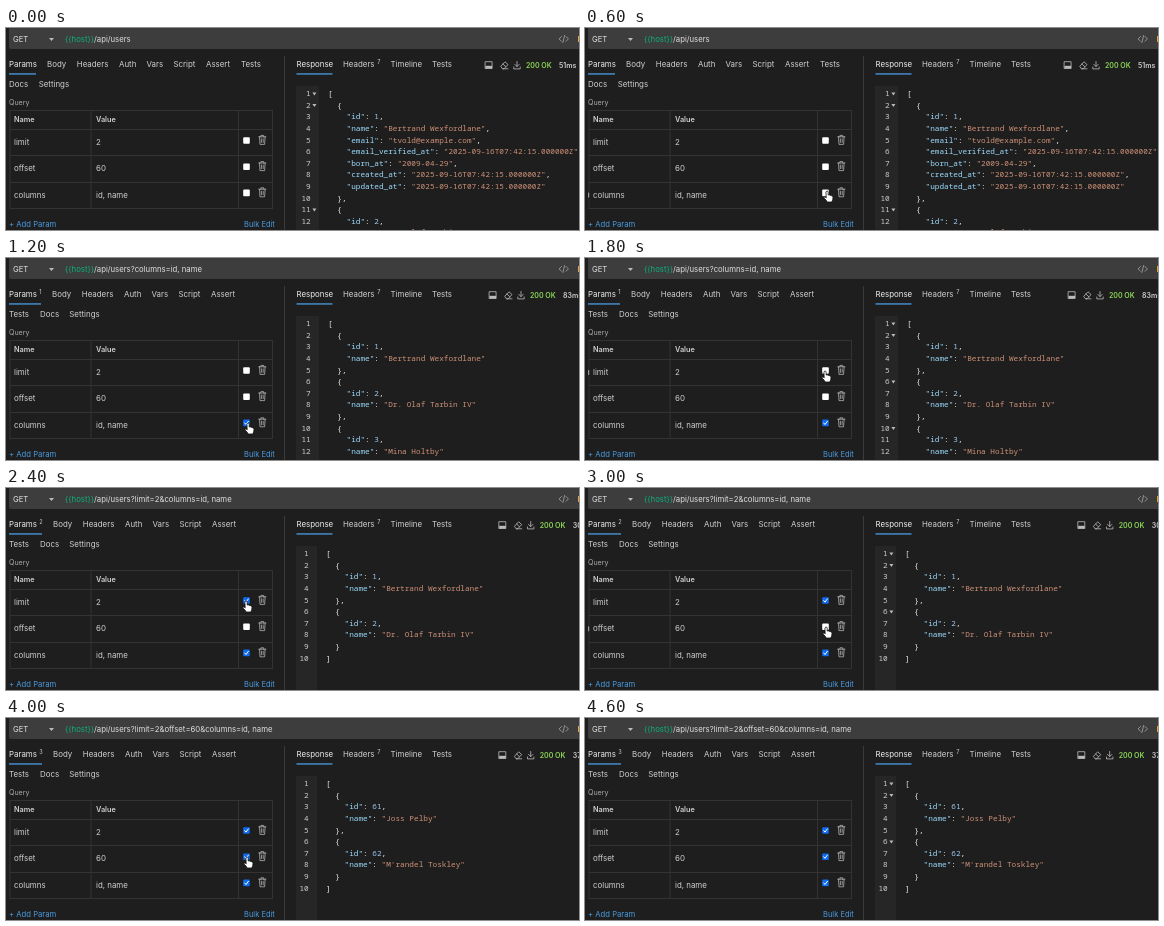
An HTML page for the animation above (4800 ms loop, 573 by 202 pixels).

```html
<!DOCTYPE html>
<html lang="en">
<head>
<meta charset="utf-8">
<title>Query parameters</title>
<style>
  html, body { margin: 0; width: 573px; height: 202px; overflow: hidden; background: #1e1e1e; }
  svg { display: block; }
  text { font: 7.9px Inter, sans-serif; fill: #d0d0d0; white-space: pre; }
  .code text { font: 500 7.72px "Noto Sans Mono", "DejaVu Sans Mono", monospace; }
</style>
</head>
<body>
<svg id="stage" width="573" height="202" viewBox="0 0 573 202"></svg>
<script>
const LOOP = 4800, STEP = 200;
const LINE = 11.6, CHAR = 4.63;
const AMBER = '#e8a33a', BLUE = '#4a9be0';
const ROWS = [
  { key: 'limit', value: '2', y: 114, from: 2000 },
  { key: 'offset', value: '60', y: 140.2, from: 3200 },
  { key: 'columns', value: 'id, name', y: 166.4, from: 800 }
];

// Pointer stops: time, x, y, row showing its drag handle (-1 for none)
const POINTER = [
  [200, 247, 169, 2], [400, 243, 165, 2], [600, 241, 163, 2], [800, 241, 164, -1],
  [1200, 241, 165, -1], [1400, 241, 160, 2], [1600, 239, 116, 0], [1800, 239, 113, 0],
  [2000, 239, 113, -1], [2600, 239, 115, -1], [2800, 240, 136, 1], [3000, 240, 139, 1],
  [3200, 240, 139, -1], [4200, 240, 131, 1]
];
const POINTER_END = 4400;

const stamp = '2025-09-16T07:42:15.000000Z';
const user = (id, name) => ({ id, name });
const first = user(1, 'Bertrand Wexfordlane');
const second = user(2, 'Dr. Olaf Tarbin IV');
const full = {
  ...first, email: 'tvold@example.com', email_verified_at: stamp,
  born_at: '2009-04-29', created_at: stamp, updated_at: stamp
};
const RESPONSES = [
  { from: 0, foldFrom: 0, data: [full, second], ms: '51ms', shift: 0, codeX: 322 },
  { from: 1200, foldFrom: 1600, data: [first, second, user(3, 'Mina Holtby'), user(4, '')], ms: '83ms', shift: 4, codeX: 322 },
  { from: 2400, foldFrom: 2800, data: [first, second], ms: '30ms', shift: 13.7, codeX: 320 },
  { from: 3800, foldFrom: 4200, data: [user(61, 'Joss Pelby'), user(62, "M'randel Toskley")], ms: '37ms', shift: 13.7, codeX: 320 }
];

const esc = s => s.replace(/&/g, '&amp;').replace(/</g, '&lt;').replace(/>/g, '&gt;');
const span = (s, fill) => `<tspan fill="${fill}">${esc(s)}</tspan>`;
const text = (x, y, s, attrs = '') => `<text x="${x}" y="${y}" ${attrs}>${esc(s)}</text>`;
const rect = (x, y, w, h, fill, r = 0) =>
  `<rect x="${x}" y="${y}" width="${w}" height="${h}" rx="${r}" fill="${fill}"/>`;
const path = (d, stroke, fill = 'none', width = 0.8, extra = '') =>
  `<path d="${d}" stroke="${stroke}" fill="${fill}" stroke-width="${width}" stroke-linejoin="round" stroke-linecap="round" ${extra}/>`;
const style = s => `style="${s}"`;
const latest = (list, t, start) => list.filter(item => start(item) <= t).pop();

function topBar(active) {
  const query = active.map(r => `${r.key}=${r.value}`).join('&');
  const url = span('{{host}}', '#0bb27e') + span('/api/users' + (query && '?' + query), '#e0e0e0');
  return rect(3, 0, 574, 21, '#3d3d3d', 2) + rect(3, 0, 570, 4, '#3d3d3d')
    + text(7, 13.8, 'GET', style('fill:#e4e4e4;font-size:7.7px'))
    + path('M43 10h5l-2.5 3z', 'none', '#bbb')
    + `<text x="59" y="13.8" style="font-size:7.74px">${url}</text>`
    + path('M555.5 8.5l-2.4 2.4 2.4 2.4M560 8.5l2.4 2.4-2.4 2.4M558.6 7.5l-1.7 7', '#aaa')
    + rect(572, 8, 1, 6, AMBER);
}

function requestTabs(count) {
  const shift = count ? (count > 1 ? 6 : 5) : 0;
  const names = [['Body', 41], ['Headers', 70.8], ['Auth', 113], ['Vars', 140.5], ['Script', 167.5], ['Assert', 200]];
  const lower = count ? [['Tests', 3], ['Docs', 34], ['Settings', 63.3]] : [['Docs', 3], ['Settings', 32.7]];
  return text(3, 39.3, 'Params', style('fill:#eee'))
    + rect(3, 45.3, 27 + shift, 1.3, BLUE)
    + (count ? text(33.2, 36.2, String(count), style('font-size:5.6px')) : '')
    + names.map(([s, x]) => text(x + shift, 39.3, s)).join('')
    + (count ? '' : text(235, 39.3, 'Tests'))
    + lower.map(([s, x]) => text(x, 58.6, s)).join('');
}

function checkbox(y, on) {
  return rect(237.2, y - 4.8, 6.6, 6.6, on ? '#0f6bf0' : '#fff', 1)
    + (on ? path(`M238.7 ${y - 1.4}l1.3 1.5 2.4 -3.2`, '#fff', 'none', 1) : '');
}

function trash(y) {
  return path('M-3.6 -3.2h7.2M-1.4 -3.2v-1.4h2.8v1.4M-2.8 -3.2l.5 7.6h4.6l.5 -7.6M-.9 -1.2v3.6M.9 -1.2v3.6',
    '#bbb', 'none', 0.75, `transform="translate(256.3 ${y - 2})"`);
}

function table(active) {
  const lines = 'M4 82.5H266.5M4 101.5H266.5M4 127.5H266.5M4 154.5H266.5M4 180.5H266.5'
    + 'M4 82.5V180.5M85 82.5V180.5M232.5 82.5V180.5M266.5 82.5V180.5';
  const head = style('font-weight:600;font-size:7.3px');
  return text(3, 77.3, 'Query', style('font-size:7.1px;fill:#aaa'))
    + path(lines, '#333', 'none', 1)
    + text(8, 94, 'Name', head) + text(90, 94, 'Value', head)
    + ROWS.map(r => text(8, r.y + 3.1, r.key) + text(90, r.y + 3.1, r.value)
      + checkbox(r.y, active.includes(r)) + trash(r.y)).join('')
    + text(3, 198.8, '+ Add Param', style(`fill:${BLUE};font-size:7.7px`))
    + text(238, 198.8, 'Bulk Edit', style(`fill:${BLUE};font-size:7.5px`));
}

function responseBar({ ms, shift }) {
  const icons = path('M479.5 33.7h6.6v6.8h-6.6z', '#bbb') + rect(479.5, 37.8, 6.6, 2.7, '#bbb')
    + path('M495 38l4-4.2 3 2.8 -4 4.2h-1.2zM496.9 36l3 2.8M497 40.8h5', '#bbb')
    + path('M511 33.5v5M508.8 36.4l2.2 2.2 2.2-2.2M507.8 39v1.9h6.4v-1.9', '#bbb');
  const bold = 'font-size:7px;font-weight:600';
  return text(290.5, 39.3, 'Response', style('fill:#eee')) + rect(290.5, 45.3, 36, 1.3, BLUE)
    + text(337, 39.3, 'Headers') + text(371.3, 36.2, '7', style('font-size:5.6px'))
    + text(384.5, 39.3, 'Timeline') + text(426, 39.3, 'Tests')
    + `<g transform="translate(${shift} 0)">${icons}`
    + text(520, 39.6, '200 OK', style(`fill:#8cd656;${bold}`))
    + text(553, 39.6, ms, style(bold)) + '</g>';
}

// Each line: indent in characters, coloured markup, whether it can fold
function jsonLines(data) {
  const plain = s => span(s, '#f0f0ec');
  const lines = [[0, plain('['), true]];
  data.forEach((item, i) => {
    lines.push([2, plain('{'), true]);
    Object.entries(item).forEach(([key, value], k, all) => {
      const shown = span(JSON.stringify(value), typeof value === 'number' ? '#9cc9f0' : '#ce9178');
      lines.push([4, span(`"${key}"`, '#9cdcfe') + plain(': ') + shown + plain(k < all.length - 1 ? ',' : '')]);
    });
    lines.push([2, plain(i < data.length - 1 ? '},' : '}')]);
  });
  lines.push([0, plain(']')]);
  return lines;
}

function codePane({ data, codeX, foldFrom }, t) {
  const body = jsonLines(data).slice(0, 13).map(([indent, markup, folds], i) => {
    const y = 68.2 + i * LINE;
    const arrow = folds && t >= foldFrom
      ? path(`M${codeX - 15.6} ${y - 3.7}h4l-2 3z`, 'none', '#bbb') : '';
    return text(codeX - 17.3, y, String(i + 1), 'text-anchor="end"') + arrow
      + `<text x="${codeX + indent * CHAR}" y="${y}">${markup}</text>`;
  }).join('');
  return rect(290, 58, codeX - 299, 144, '#262626') + `<g class="code">${body}</g>`;
}

function pointer(t) {
  const stop = t < POINTER_END && latest(POINTER, t, p => p[0]);
  if (!stop) return '';
  const [, x, y, row] = stop;
  const hand = 'M0 1.2Q.2 0 1.1 0T2.2 1.2V4Q3.4 3.4 4 4.3 5.2 3.9 5.6 4.9 7 4.7 7 6.2 7 9 5.8 11H1.2Q.3 9-1.7 7.3C-2.6 6.2-1.2 5.4 0 6.6z';
  const handle = row < 0 ? '' : rect(3, ROWS[row].y - 2, 1.2, 5, '#999', 0.5);
  return handle + path(hand, '#111', '#fff', 0.8, `transform="translate(${x} ${y})"`);
}

function draw(t) {
  const active = ROWS.filter(r => t >= r.from);
  const response = latest(RESPONSES, t, r => r.from);
  document.getElementById('stage').innerHTML = rect(0, 0, 573, 202, '#1e1e1e')
    + topBar(active) + requestTabs(active.length) + table(active)
    + rect(278, 28, 1, 174, '#3a3a3a')
    + responseBar(response) + codePane(response, t) + pointer(t);
}

const start = performance.now();
let drawn = -1;
function tick() {
  const t = Math.floor(((performance.now() - start) % LOOP) / STEP) * STEP;
  if (t !== drawn) draw(drawn = t);
  requestAnimationFrame(tick);
}
tick();
</script>
</body>
</html>
```
